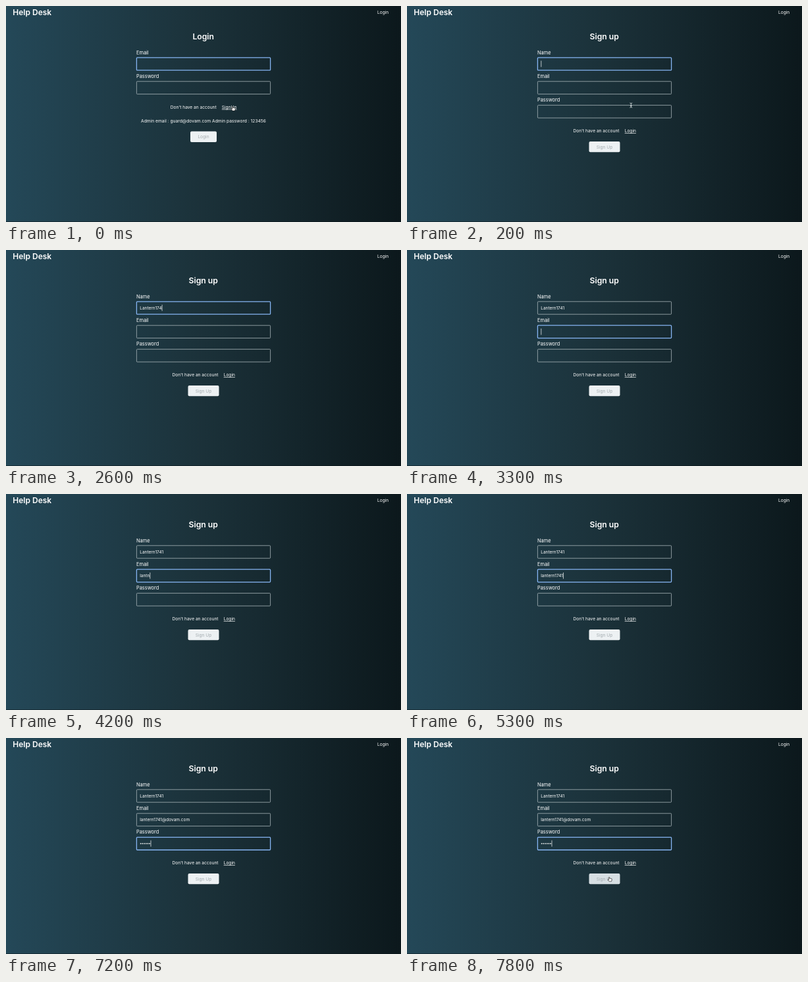
An HTML page that plays this animation: 600 px wide and 330 px high, repeating every 8000 ms.

```html
<!DOCTYPE html>
<html lang="en">
<head>
<meta charset="utf-8">
<title>Help Desk</title>
<style>
  html, body { margin: 0; width: 100%; height: 100%; overflow: hidden; background: #1b3139; }
  svg { display: block; width: 600px; height: 330px; font-family: Inter, "Open Sans", sans-serif; }
  text { fill: #fff; font-size: 6.6px; white-space: pre; }
  .brand { font-size: 12px; font-weight: 600; }
  .title { font-size: 12.2px; font-weight: 600; text-anchor: middle; }
  .label { font-size: 7.4px; }
  .value { font-size: 6.5px; }
  .link { text-decoration: underline; }
  .mid { text-anchor: middle; }
  .button rect { fill: #edf1f3; }
  .button.hover rect { fill: #d7dfe3; }
  .button text { fill: #a3abaf; text-anchor: middle; }
  .field rect { fill: none; stroke: #a9b5b9; stroke-width: .8; }
  .field.focus rect { stroke: #86b5f3; stroke-width: 1.3; }
</style>
</head>
<body>
<svg viewBox="0 0 600 330">
  <defs>
    <linearGradient id="night">
      <stop offset="0" stop-color="#244858"/>
      <stop offset=".5" stop-color="#1b3139"/>
      <stop offset="1" stop-color="#0c181c"/>
    </linearGradient>
  </defs>
  <rect width="600" height="330" fill="url(#night)"/>
  <rect y="329" width="600" height="1" fill="#0c171b" opacity=".5"/>
  <text class="brand" x="10.3" y="14.4">Help Desk</text>
  <text x="564" y="12.4">Login</text>

  <g id="login">
    <text class="title" x="299.7" y="51">Login</text>
    <g class="fields"></g>
    <text x="249.7" y="156.7">Don't have an account</text>
    <text class="link" x="327.8" y="156.7">SignUp</text>
    <text class="mid" x="300" y="177.6" style="font-size:6.7px">Admin email : guard@dovam.com Admin password : 123456</text>
    <g class="button">
      <rect x="280" y="191.5" width="40" height="16.5" rx="2"/>
      <text x="300" y="202.1">Login</text>
    </g>
  </g>

  <g id="signup">
    <text class="title" x="299.7" y="51">Sign up</text>
    <g class="fields"></g>
    <text x="252.5" y="193">Don't have an account</text>
    <text class="link" x="330.7" y="193">Login</text>
    <g class="button" id="send">
      <rect x="276.5" y="207" width="47" height="16.3" rx="2"/>
      <text x="300" y="217.5">Sign Up</text>
    </g>
  </g>

  <path id="caret" stroke="#fff" stroke-width=".7"/>
  <g id="pointer" stroke-linejoin="round" stroke-linecap="round">
    <path id="hand" fill="#fff" stroke="#111" stroke-width=".6"
      d="M-1.6-3.2q.7-.9 1.3 0v2l.7-.4.9.3.8.1.8.5.3 1.2-.6 2.6H-.9L-2.8 1q-.4-1 .4-.9l.8.5z"/>
    <path id="beam" fill="none" stroke="#dfe6e8" stroke-width=".8"
      d="M-1.5-3.5Q0-3.5 0-2.5V2.5Q0 3.5-1.5 3.5M1.5-3.5Q0-3.5 0-2.5M0 2.5Q0 3.5 1.5 3.5M-1 .8H1"/>
    <path id="arrow" fill="#111" stroke="#fff" stroke-width=".6"
      d="M-1.5-3.5V3L0 1.7 1 4l1-.5L1.1 1.4H3z"/>
  </g>
</svg>
<script>
const LOOP = 8000, SVG = "http://www.w3.org/2000/svg";
const LEFT = 203.3, DOT = 2.7;
const $ = id => document.getElementById(id);

function make(parent, tag, attrs, text = "") {
  const el = document.createElementNS(SVG, tag);
  for (const key in attrs) el.setAttribute(key, attrs[key]);
  el.textContent = text;
  return parent.appendChild(el);
}

const rowY = row => 78.4 + row * 36.4;

function makeFields(page, labels) {
  const parent = page.querySelector(".fields");
  return labels.map((label, row) => {
    const y = rowY(row);
    make(parent, "text", { class: "label", x: 198, y: y - 4.9 }, label);
    const box = make(parent, "g", { class: "field" });
    make(box, "rect", { x: 198.4, y: y + .4, width: 203.2, height: 19.4, rx: 1 });
    const value = make(box, "text", { class: "value", x: LEFT, y: y + 12.2 });
    return { box, value };
  });
}

makeFields($("login"), ["Email", "Password"])[0].box.classList.add("focus");
const fields = makeFields($("signup"), ["Name", "Email", "Password"]);
const dots = Array.from({ length: 6 }, (_, i) =>
  make(fields[2].box, "circle", { cx: LEFT + DOT * (i + .5), cy: rowY(2) + 10.1, r: .9, fill: "#fff" }));

// Each step: time, focused field, its text.
const steps = [];
const put = (time, field, text) => steps.push({ time, field, text });
function type(start, gap, field, before, added) {
  for (let i = 1; i <= added.length; i++)
    put(start + (i - 1) * gap, field, before + added.slice(0, i));
}

put(100, 0, "");
type(1600, 100, 0, "", "Lantern174");
put(2800, 0, "Lantern1741");
put(3000, 1, "");
put(3800, 1, "l");
type(4000, 60, 1, "l", "antn");
type(4300, 100, 1, "lantn", "re");
put(4500, 1, "lantn");
put(4600, 1, "lant");
type(4800, 80, 1, "lant", "ern1741");
type(5500, 70, 1, "lantern1741", "@dovam.com");
put(6200, 2, "");
put(6500, 2, "*");
put(6600, 2, "**");
put(6800, 2, "***");
type(7100, 50, 2, "***", "***");
put(7500, 2, "******");

// Pointer keys: time, x, y. It hides while typing.
const path = [
  [0, 345, 157], [150, 345, 157], [400, 322, 131], [600, 288, 101], [800, 272.5, 90],
  [1600, 272.5, 90], [7400, 277, 134], [7500, 284, 156], [7600, 294, 184],
  [7700, 304, 209], [7800, 308, 216], [LOOP, 308, 216]
];

function pointerAt(t) {
  const i = path.findIndex(key => key[0] > t);
  const [t0, x0, y0] = path[i - 1], [t1, x1, y1] = path[i];
  const k = (t - t0) / (t1 - t0);
  return [x0 + (x1 - x0) * k, y0 + (y1 - y0) * k];
}

const show = (el, on) => el.setAttribute("visibility", on ? "visible" : "hidden");

function drawFields(t) {
  const texts = ["", "", ""];
  let last = null;
  for (const step of steps) {
    if (step.time > t) break;
    texts[step.field] = step.text;
    last = step;
  }
  fields.forEach(({ box, value }, i) => {
    box.classList.toggle("focus", !!last && last.field === i);
    if (i < 2 && value.textContent !== texts[i]) value.textContent = texts[i];
  });
  dots.forEach((dot, i) => dot.setAttribute("opacity", i < texts[2].length ? 1 : 0));

  const lit = last && Math.floor((t - last.time) / 500) % 2 === 0;
  show($("caret"), lit);
  if (!lit) return;
  const width = last.field === 2 ? DOT * texts[2].length
    : last.text ? fields[last.field].value.getComputedTextLength() : 0;
  $("caret").setAttribute("d", `M${LEFT + width + .5} ${rowY(last.field) + 5.2}v9.6`);
}

function drawPointer(t, signup) {
  const seen = t < 1600 || t >= 7400;
  const [x, y] = pointerAt(t);
  const onButton = signup && seen && x > 276 && x < 324 && y > 207 && y < 223;
  const inField = signup && [0, 1, 2].some(row => y > rowY(row) && y < rowY(row) + 20);
  const kind = !signup || onButton ? "hand" : inField ? "beam" : "arrow";
  $("pointer").setAttribute("transform", `translate(${x} ${y})`);
  for (const id of ["hand", "beam", "arrow"]) show($(id), seen && id === kind);
  $("send").classList.toggle("hover", onButton);
}

function draw(now) {
  const t = Math.max(0, now) % LOOP;
  const signup = t >= 100;
  $("login").style.display = signup ? "none" : "";
  $("signup").style.display = signup ? "" : "none";
  drawFields(t);
  drawPointer(t, signup);
}

const start = performance.now();
function tick() {
  draw(performance.now() - start);
  requestAnimationFrame(tick);
}
tick();
</script>
</body>
</html>
```
